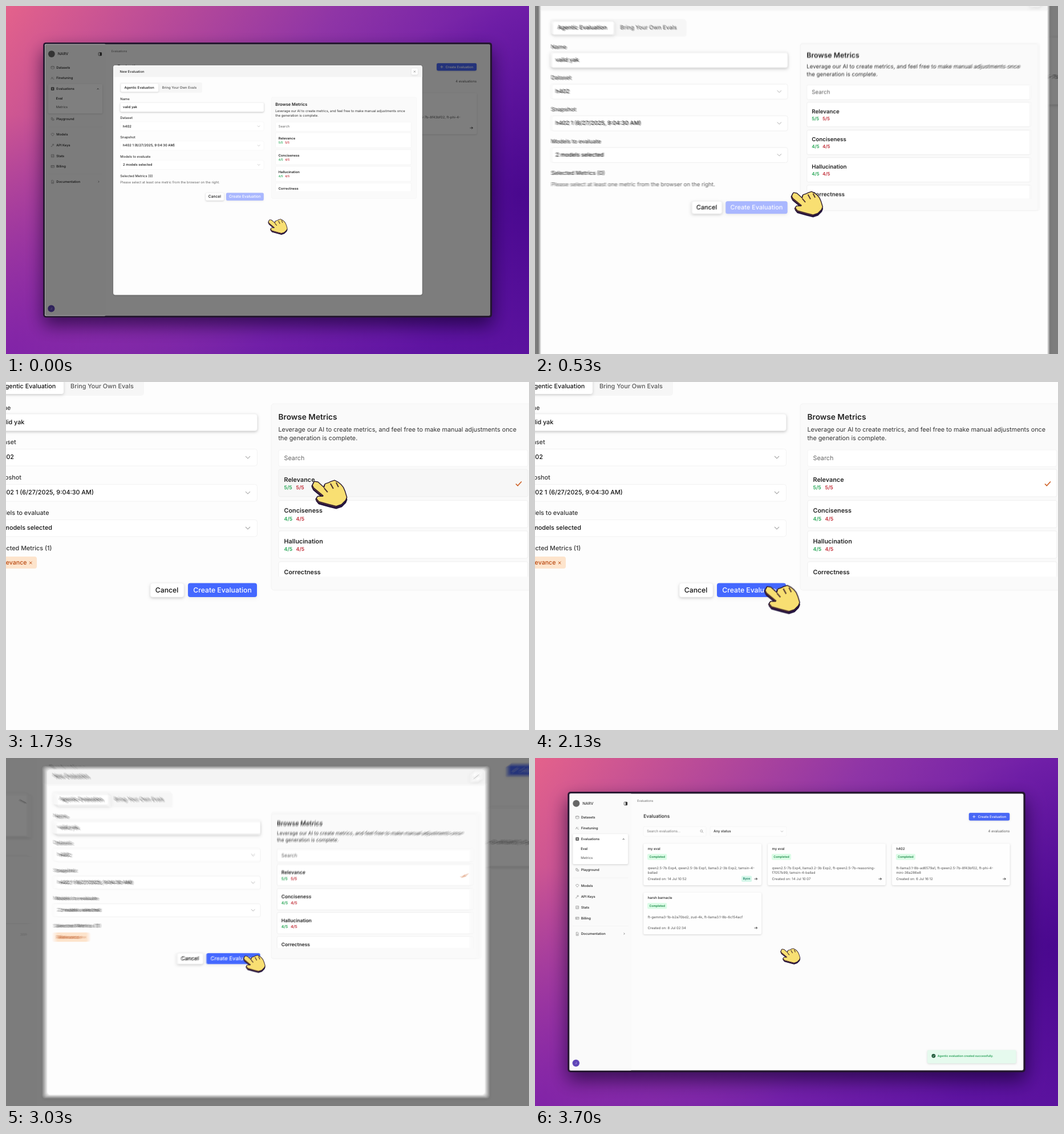
An HTML page with a canvas that plays this animation: 917x610 px, repeating every 3.73 s.

```html
<!DOCTYPE html>
<html lang="en">
<head>
<meta charset="utf-8">
<title>Create evaluation</title>
<style>
html, body { margin: 0; width: 100%; height: 100%; overflow: hidden; }
canvas { display: block; width: 917px; height: 610px; }
</style>
</head>
<body>
<canvas id="stage" width="917" height="610"></canvas>
<script>
const W = 917, H = 610, LOOP = 3730;
const FOCUS = { x: 466, y: 305 }, DIALOG_SCALE = 1.8;
const REST = 0.98, ZOOMED = 1.8;
const screen = document.getElementById('stage').getContext('2d');
const buffer = Object.assign(document.createElement('canvas'), { width: W, height: H });
const c = buffer.getContext('2d');
c.textBaseline = 'middle';
c.textRendering = 'geometricPrecision';

// Timing
const clamp = v => Math.min(1, Math.max(0, v));
const mix = (a, b, p) => a + (b - a) * p;
const ease = (t, from, to) => { const p = clamp((t - from) / (to - from)); return p * p * (3 - 2 * p); };
const spring = (t, from) => { const k = Math.max(0, t - from) * 0.006; return 1 - (1 + k) * Math.exp(-k); };

const MOVES = [[100, 480, 456, 318], [800, 1140, 505.4, 231.7], [1760, 2140, 431, 334.3]];

function pose(t) {
  let x = 460, y = 375.4;
  for (const [from, to, nx, ny] of MOVES) {
    const p = ease(t, from, to);
    x = mix(x, nx, p);
    y = mix(y, ny, p);
  }
  const press = ease(t, 1250, 1350) - ease(t, 1400, 1520) + ease(t, 2470, 2620) - ease(t, 3060, 3210);
  return {
    x, y,
    size: 1 - 0.21 * press,
    zoom: REST + (ZOOMED - REST) * (spring(t, 60) - spring(t, 2760))
  };
}

// Drawing helpers
let zoom = 1;

function text(str, x, y, size, color = '#222', weight = 400, align = 'left') {
  c.font = `${weight} ${size}px Inter, sans-serif`;
  c.textAlign = align;
  c.fillStyle = color;
  c.fillText(str, x, y);
}

function box(x, y, w, h, r, fill, border, shadow = 0) {
  c.beginPath();
  c.roundRect(x, y, w, h, r);
  c.save();
  if (shadow) {
    c.shadowColor = `rgba(0,0,0,${shadow})`;
    c.shadowBlur = 3 * zoom;
    c.shadowOffsetY = zoom;
  }
  c.fillStyle = fill;
  c.fill();
  c.restore();
  if (border) {
    c.strokeStyle = border;
    c.lineWidth = 0.8;
    c.stroke();
  }
}

function line(color, width, ...points) {
  c.beginPath();
  for (let i = 0; i < points.length; i += 2) c.lineTo(points[i], points[i + 1]);
  c.strokeStyle = color;
  c.lineWidth = width;
  c.stroke();
}

function disc(x, y, r, fill) {
  c.beginPath();
  c.arc(x, y, r, 0, 7);
  c.fillStyle = fill;
  c.fill();
}

function inSpace(x, y, scale, draw) {
  c.save();
  c.translate(x, y);
  c.scale(scale, scale);
  draw();
  c.restore();
}

const zoomed = (scale, draw) => inSpace(FOCUS.x * (1 - scale), FOCUS.y * (1 - scale), scale, draw);

// Backdrop
function gradient(g, ...stops) {
  stops.forEach((color, i) => g.addColorStop(i / (stops.length - 1), color));
  c.fillStyle = g;
  c.fillRect(0, 0, W, H);
}

function drawBackdrop() {
  gradient(c.createLinearGradient(0, 0, 760, 560), '#e4628b', '#b94b98', '#8f35a6', '#711fa8', '#5f14a2');
  gradient(c.createRadialGradient(900, 330, 0, 900, 330, 330), 'rgba(66,4,136,.75)', 'rgba(66,4,136,0)');
  gradient(c.createRadialGradient(0, 610, 0, 0, 610, 420), 'rgba(118,26,170,.75)', 'rgba(118,26,170,0)');
}

// Page
const MENU = [
  ['Datasets', 104, 'M0 1.2Q3-.6 6 1.2V4.8Q3 6.6 0 4.8ZM0 1.5Q3 3 6 1.5'],
  ['Finetuning', 123, 'M0 5L2 1L3 4L6 5M4 1.5H5'],
  ['Evaluations', 142, 'M.5 .5H5.5V5.5H.5ZM2 2V4M4 2V4M1 1H5V5H1Z'],
  ['Playground', 196, 'M.5 .5H3V4H.5ZM3 3H5.5V5.5H2'],
  ['Models', 224, 'M0 2L1.5 .5H4.5L6 2L3 5.5Z'],
  ['API Keys', 243, 'M0 6L3 3M1 5L2 6M3 3V1H5V3Z'],
  ['Stats', 262, 'M.5 .5H5.5V5.5H.5ZM2 2.5V4.5M4 1.5V4.5'],
  ['Billing', 281, 'M0 1H6V5H0ZM0 2.4H6M1 4H3'],
  ['Documentation', 308.5, 'M1 0H4L5 1V6H1ZM2 3H4M2 4.5H4']
].map(([label, y, path]) => [label, y, new Path2D(path)]);

const CARDS = [
  [190, 150, 'my eval', ['qwen2.5-7b Exp4, qwen2.5-3b Exp1, llama3.2-3b Exp2, tamsin-4-', 'ballad'], '14 Jul 10:52', true],
  [408, 150, 'my eval', ['qwen2.5-7b Exp4, llama3.2-3b Exp2, ft-qwen2.5-7b-reasoning-', 'f7057b99, tamsin-4-ballad'], '14 Jul 10:07'],
  [626, 150, 'h402', ['ft-llama3.1-8b-ad6579a1, ft-qwen2.5-7b-8f43bf02, ft-phi-4-', 'mini-36a286e8'], '6 Jul 16:12'],
  [190, 236, 'harsh barnacle', ['ft-gemma3-1b-b2a70bd2, zud-4k, ft-llama3.1-8b-6c154acf'], '8 Jul 02:34']
];

function drawSidebar() {
  box(60, 62, 109, 486, 2, '#fafafa');
  disc(72, 79.5, 6, '#666');
  text('NARV', 83, 80, 6.8, '#333', 500);
  box(156, 77, 5.5, 5.5, 1, '#fff', '#444');
  c.fillStyle = '#333';
  c.fillRect(158.5, 77, 3, 5.5);
  box(66, 133, 97, 53, 2, '#fff', '', 0.16);
  for (const [label, y, path] of MENU) {
    text(label, 80.5, y, 5.9, '#222', 500);
    c.strokeStyle = label === 'Evaluations' ? '#222' : '#888';
    c.lineWidth = 0.7;
    inSpace(71, y - 3, 0.95, () => c.stroke(path));
  }
  text('Eval', 80, 159.5, 5.9, '#111', 500);
  text('Metrics', 80, 175, 5.9, '#555');
  line('#222', 0.8, 153.5, 143, 155, 141.3, 156.5, 143);
  line('#555', 0.7, 155.5, 306.5, 157, 308, 155.5, 309.5);
  line('#eee', 0.6, 66, 210, 163, 210);
  line('#eee', 0.6, 66, 294.5, 163, 294.5);
  disc(71.5, 535, 6.2, '#5f45b8');
  text('J', 71.5, 535.2, 5, '#e6e0ff', 400, 'center');
}

function drawCard([x, y, title, models, date, own]) {
  box(x, y, 207, 73, 2, '#fefefe', '', 0.15);
  text(title, x + 7.5, y + 9.5, 6, '#222', 500);
  box(x + 7, y + 18, 34, 10.5, 2, '#dcfce7');
  text('Completed', x + 24, y + 23.4, 5.2, '#178a45', 600, 'center');
  const top = y + (models.length > 1 ? 43.2 : 42.8);
  models.forEach((row, i) => text(row, x + 7.5, top + i * 8.2, 6, '#555'));
  text('Created on: ' + date, x + 7.5, y + 62, 6, '#555');
  if (own) {
    box(x + 172, y + 56.5, 18, 10.5, 2, '#d5f7ea');
    text('Byoe', x + 181, y + 61.8, 5.2, '#147a5c', 600, 'center');
  }
  const ax = x + 199.5, ay = y + 62;
  line('#222', 0.7, ax - 5, ay, ax, ay, ax - 2, ay - 2, ax, ay, ax - 2, ay + 2);
}

function drawPage() {
  c.save();
  c.shadowColor = 'rgba(15,0,40,.65)';
  c.shadowBlur = 32 * zoom;
  c.shadowOffsetY = 14 * zoom;
  c.beginPath();
  c.roundRect(57, 59, 803, 492, 5);
  c.fillStyle = '#24172f';
  c.fill();
  c.restore();
  box(60.3, 62.3, 796.4, 485.4, 2.5, '#fcfcfc');
  drawSidebar();
  text('Evaluations', 179, 75, 5.2, '#666');
  text('Evaluations', 190, 102, 8.4, '#222', 500);
  box(761, 96, 71.5, 13.5, 2.5, '#4867f6', '', 0.1);
  line('#fff', 0.8, 767.5, 102.7, 772.5, 102.7);
  line('#fff', 0.8, 770, 100.2, 770, 105.2);
  text('Create Evaluation', 777, 102.8, 5.9, '#fff', 500);
  box(190, 120, 110, 17, 2, '#fdfdfd', '#f7f7f7');
  box(307, 120, 134, 17, 2, '#fdfdfd', '#f7f7f7');
  text('Search evaluations...', 196, 128.5, 6, '#777');
  c.beginPath();
  c.arc(291.7, 127.8, 1.9, 0, 7);
  c.strokeStyle = '#888';
  c.lineWidth = 0.6;
  c.stroke();
  line('#888', 0.6, 293.1, 129.2, 295, 131);
  text('Any status', 313, 128.5, 6, '#222', 500);
  line('#aaa', 0.7, 431, 127.5, 433, 129.5, 435, 127.5);
  text('4 evaluations', 832.5, 128.5, 6, '#555', 400, 'right');
  CARDS.forEach(drawCard);
}

function drawToast(t) {
  const p = ease(t, 3480, 3670);
  if (!p) return;
  c.save();
  c.globalAlpha = p;
  c.translate(0, 14 * (1 - p));
  box(688, 512, 156, 23.5, 3, '#e6faee', '', 0.12);
  disc(699, 522.3, 3.4, '#1d5637');
  line('#e6faee', 0.8, 697.4, 522.3, 698.6, 523.5, 700.7, 521);
  text('Agentic evaluation created successfully.', 706, 522.5, 5, '#23a055', 600);
  c.restore();
}

// Dialog, laid out at full zoom
const FIELDS = [
  ['Name', 45.5, 'valid yak', 70.5],
  ['Dataset', 105.5, 'h402', 132],
  ['Snapshot', 167.5, 'h402 1 (6/27/2025, 9:04:30 AM)', 194],
  ['Models to evaluate', 230, '2 models selected', 256]
];
const METRICS = [['Relevance', 5, 153], ['Conciseness', 4, 207.5], ['Hallucination', 4, 261], ['Correctness', 4, 315]];

function drawForm(selected) {
  box(-23, -9, 265, 33, 5, '#f6f6f6');
  box(-20, -5, 121, 26, 4, '#fff', '', 0.16);
  text('Agentic Evaluation', -9, 7.3, 10.8, '#111', 500);
  text('Bring Your Own Evals', 113, 7.3, 10.8, '#555', 500);
  FIELDS.forEach(([label, y, value, mid], i) => {
    text(label, -22, y, 10.8, '#333', 500);
    box(-22, mid - 14.5, 462.5, 29.5, 4, '#fff', '#efefef', i ? 0 : 0.25);
    text(value, -13.3, mid, 10.8, '#111', 500);
    if (i) line('#aaa', 1.1, 420, mid - 2, 424, mid + 2, 428, mid - 2);
  });
  text(`Selected Metrics (${selected ? 1 : 0})`, -22, 292, 10.8, '#333', 500);
  c.save();
  const alpha = c.globalAlpha;
  c.globalAlpha = alpha * (1 - selected);
  if (selected < 1) text('Please select at least one metric from the browser on the right.', -22, 313.6, 10.8, '#666');
  c.globalAlpha = alpha * selected;
  if (selected) {
    box(-22, 306, 76, 21, 4, '#fde4cc');
    text('Relevance', -16, 316.7, 10.6, '#b9480f', 500);
    line('#b9480f', 1, 41, 314.8, 45.4, 319.2);
    line('#b9480f', 1, 45.4, 314.8, 41, 319.2);
  }
  c.restore();
  const y = mix(346.5, 352.6, selected);
  const tone = [[169, 68], [183, 104], [255, 255]].map(([a, b]) => mix(a, b, selected));
  box(253, y, 59, 24.5, 4, '#fff', '#f2f2f2', 0.2);
  text('Cancel', 282, y + 12.3, 12.2, '#111', 500, 'center');
  box(319, y, 121, 24.5, 4, `rgb(${tone})`, '', 0.08);
  text('Create Evaluation', 379.5, y + 12.3, 12.2, '#fff', 500, 'center');
}

function drawBrowser(hover, selected) {
  box(465, 38, 467, 327, 5, '#fafafa', '#f0f0f0');
  text('Browse Metrics', 477.5, 61.7, 13.7, '#222', 600);
  text('Leverage our AI to create metrics, and feel free to make manual adjustments once', 477.5, 83.5, 10.8, '#333');
  text('the generation is complete.', 477.5, 98.7, 10.8, '#333');
  box(478, 119, 437, 29, 3, '#fff', '#f1f1f1');
  text('Search', 487.5, 133.5, 10.8, '#666');
  c.save();
  c.beginPath();
  c.rect(470, 150, 460, 191);
  c.clip();
  METRICS.forEach(([name, score, y], i) => {
    const shade = i ? 255 : mix(255, 247, hover);
    box(478, y, 437, 48, 3, `rgb(${shade},${shade},${shade})`, '#ececec');
    text(name, 487.5, y + 18.5, 10.8, '#222', 600);
    text(score + '/5', 487.5, y + 32.5, 8.9, '#22a552', 600);
    text(score + '/5', 508.5, y + 32.5, 8.9, '#c22a35', 600);
  });
  c.restore();
  if (selected) line(`rgba(205,92,32,${selected})`, 1.5, 894, 178.5, 897.3, 181.8, 904, 174.5);
}

function drawDialog(t) {
  const open = 1 - ease(t, 3300, 3430);
  if (!open) return;
  const selected = clamp((t - 1400) / 100);
  c.save();
  c.globalAlpha = open;
  box(60.3, 62.3, 796.4, 485.4, 2.5, 'rgba(0,0,0,.5)');
  zoomed(1 / DIALOG_SCALE, () => {
    box(-44.5, -64, 995, 739, 7, '#fdfdfd', '', 0.2);
    box(-44.5, -64, 995, 37.5, [7, 7, 0, 0], '#f4f4f4');
    text('New Evaluation', -23.5, -44, 10.7, '#222', 500);
    box(916, -54, 20, 20, 4, '#fff', '', 0.1);
    line('#555', 1, 923, -47, 929, -41);
    line('#555', 1, 929, -47, 923, -41);
    drawForm(selected);
    drawBrowser(ease(t, 880, 940) - ease(t, 1850, 1930), selected);
  });
  c.restore();
}

// Pointer
const HAND = new Path2D('M1 8L4 2L10 3L21 13L23 6L29 4L33 2L39 0L45 3L50 7L54 12L57 19L60 29L58 34L51 41L42 44L30 41L12 36L8 31L10 28L19 28L20 26L3 12Z');
const KNUCKLES = new Path2D('M21 13L27 20M32 5L37 14M42 3L46 11');

function drawPointer({ x, y, size }) {
  inSpace(x, y, size / DIALOG_SCALE, () => {
    c.lineJoin = 'round';
    c.lineWidth = 3;
    for (const [dx, dy, fill, edge] of [[0, 4, '#2a1650', '#1f1238'], [-1, 1.5, '#e8833a', '#2a1638'], [0, 0, '#f8df72', '#2a1a30']]) {
      inSpace(dx, dy, 1, () => {
        c.strokeStyle = edge;
        c.stroke(HAND);
        c.fillStyle = fill;
        c.fill(HAND);
      });
    }
    c.lineWidth = 2;
    c.strokeStyle = '#4b3030';
    c.stroke(KNUCKLES);
  });
}

function drawScene(t) {
  const now = pose(t);
  zoom = now.zoom;
  drawBackdrop();
  zoomed(zoom, () => {
    drawPage();
    drawToast(t);
    drawDialog(t);
    drawPointer(now);
  });
}

// Average several instants around t for motion blur
const SHUTTER = 20, SAMPLES = 7;

function render(t) {
  const a = pose(t - SHUTTER / 2), b = pose(t + SHUTTER / 2);
  const motion = Math.abs(a.zoom - b.zoom) * 400 + Math.hypot(a.x - b.x, a.y - b.y);
  const count = motion > 0.6 ? SAMPLES : 1;
  for (let i = 0; i < count; i++) {
    drawScene(count > 1 ? t + SHUTTER * (i / (count - 1) - 0.5) : t);
    screen.globalAlpha = 1 / (i + 1);
    screen.drawImage(buffer, 0, 0);
  }
}

const start = performance.now();
function tick() {
  render((performance.now() - start) % LOOP);
  requestAnimationFrame(tick);
}
tick();
</script>
</body>
</html>
```
